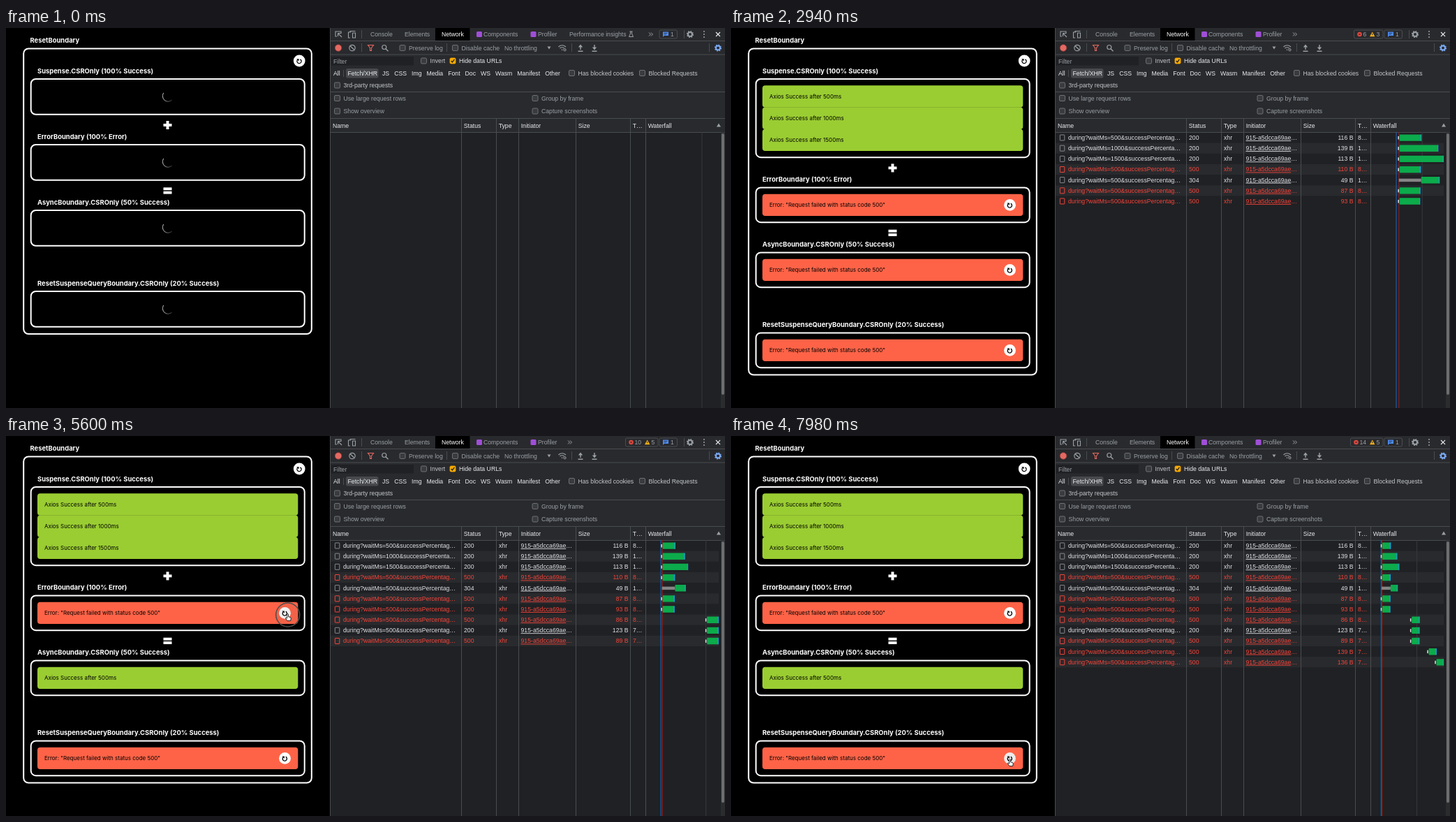
Recreate the animation shown at these times as an HTML page. Size 1030 by 544 pixels, loop 8 s.

```html
<!DOCTYPE html>
<html lang="en">
<head>
<meta charset="utf-8">
<title>Async boundaries</title>
<style>
html, body { margin: 0; width: 100%; height: 100%; overflow: hidden; background: #000; }
svg { display: block; width: 1030px; height: 544px; }
text { font: 8.7px "Liberation Sans", Arial, sans-serif; white-space: pre; }
.label { font: 700 9.42px Inter, Roboto, sans-serif; fill: #fff; }
.msg { font: 8px Inter, Roboto, sans-serif; fill: #000; }
.link { text-decoration: underline; }
</style>
</head>
<body>
<svg id="stage" viewBox="0 0 1030 544">
  <defs>
    <linearGradient id="fade"><stop offset="0" stop-color="#aaa"/><stop offset="1" stop-color="#aaa" stop-opacity=".25"/></linearGradient>
    <clipPath id="fall"><rect x="917" y="149" width="104.3" height="395"/></clipPath>
  </defs>
  <g id="tools"></g>
  <g id="live"></g>
</svg>
<script>
const LOOP = 8000, STEP = 70;
const LIGHT = '#e8eaed', SOFT = '#c3c7cb', DIM = '#9aa0a6', LINE = '#494c50', RED = '#f5443a';
const COLS = { Status: 652, Type: 702, Initiator: 734, Size: 816, 'T…': 894, Waterfall: 916 };

// ---- drawing helpers ----
const rect = (x, y, w, h, fill, more = '') => `<rect x="${x}" y="${y}" width="${w}" height="${h}" fill="${fill}" ${more}/>`;
const text = (x, y, s, fill = LIGHT, more = '') => `<text x="${x}" y="${y + 3}" fill="${fill}" ${more}>${s}</text>`;
const path = (d, stroke, width = 1, more = 'fill="none"') => `<path d="${d}" stroke="${stroke}" stroke-width="${width}" ${more}/>`;
const shape = (d, fill) => `<path d="${d}" fill="${fill}"/>`;
const circle = (x, y, r, fill, more = '') => `<circle cx="${x}" cy="${y}" r="${r}" fill="${fill}" ${more}/>`;
const ring = (x, y, r, stroke, width, more = '') => circle(x, y, r, 'none', `stroke="${stroke}" stroke-width="${width}" ${more}`);
const hline = y => rect(464, y, 566, 1, LINE);
const vline = (x, y, h, fill = LINE) => rect(x, y, 1, h, fill);
const gear = (x, y, c, r = 3) => ring(x, y, r, c, r * .67) +
  ring(x, y, r * 1.47, c, r * .47, `stroke-dasharray="${r * .58} ${r * .57}"`);
const check = (x, y, label, fill, on) =>
  rect(x - 4, y - 4, 8, 8, on ? '#f9ab00' : '#3a3b3e', `rx="1.5" stroke="${on ? '#f9ab00' : '#7d8186'}" stroke-width=".8"`) +
  (on ? path(`M${x - 2.3} ${y}l1.7 1.9 3-4`, '#202124', 1.3) : '') + text(x + 9, y, label, fill);

function toolsMarkup() {
  let s = rect(464, 0, 566, 149, '#292a2d') + rect(464, 149, 566, 395, '#202124') +
    vline(464, 0, 544) + rect(615, 0, 49.5, 18, '#000');
  s += [18, 37.5, 91, 129, 149].map(hline).join('');

  // tab bar
  s += path('M474 12h-2V5h8v3M475.5 7.5l5.5 5.5M475.5 7.5v4.5M475.5 7.5h4.5', DIM, 1.1);
  s += path('M493 6V4.5h7.5M493 14h-2.5V6h4M496.5 7h4v7h-4z', DIM, 1.1);
  s += vline(509, 3, 12) + text(522, 9, 'Console', DIM) + text(571, 9, 'Elements', DIM) +
    text(624, 9, 'Network', '#fff') + text(684, 9, 'Components', DIM) + text(762, 9, 'Profiler', DIM);
  s += rect(674, 5, 8, 8, '#a04fd8', 'rx="1.5"') + rect(751.5, 5, 8, 8, '#a04fd8', 'rx="1.5"');
  s += rect(936, 3, 25.5, 12, 'none', `rx="2" stroke="${LINE}"`) + shape('M941 5.5h8v5.5h-6l-2 2z', '#4c8df6') +
    path('M942.5 7.3h5M942.5 9h3.5', '#292a2d', .7) + text(952, 9, '1', DIM);
  s += vline(971, 3, 12) + gear(980, 9, DIM) + [5, 9, 13].map(y => circle(1000, y, 1, DIM)).join('') +
    path('M1017 6l6 6M1023 6l-6 6', LIGHT, 1.2);

  // record bar
  s += circle(476, 28.5, 4.8, '#e46962', 'stroke="#8a3a38" stroke-width=".8"');
  s += ring(496, 28.5, 4.2, DIM, 1.2) + path('M493 25.5l6 6', DIM, 1.2);
  s += vline(509, 22, 12) + path('M518.5 24.5h8l-3 4v4h-2v-4z', '#e46962', 1.1);
  s += ring(541.8, 27.5, 3, DIM, 1.2) + path('M544 29.8l3.5 3.5', DIM, 1.4);
  s += check(568, 28.5, 'Preserve log', DIM) + vline(631, 22, 12) + check(643.5, 28.5, 'Disable cache', DIM) +
    text(714, 28.5, 'No throttling', DIM) + shape('M775.5 26.5h5l-2.5 4z', DIM);
  s += path('M791.5 27q5-4.5 10.5 0M793.5 29q3-2.5 6 0M796 30.5l1 1.5', DIM, 1.2) + gear(800.5, 31.2, DIM, 1.4);
  s += vline(810, 22, 12) + path('M823 31v-5M819.5 33.2h7M843 24v5M839.5 33.2h7', DIM, 1.4) +
    shape('M819.8 27.5l3.2-4 3.2 4zM839.8 27.5l3.2 4 3.2-4z', DIM);
  s += vline(1007, 22, 12) + gear(1020, 28.5, '#7cacf8');

  // filters
  s += rect(466, 41, 118, 12.5, '#202124') + text(469, 48, 'Filter', DIM) +
    check(598.5, 47, 'Invert', SOFT) + check(640, 47, 'Hide data URLs', LIGHT, true);
  const kinds = 'JS CSS Img Media Font Doc WS Wasm Manifest Other'.split(' ');
  s += rect(487, 58, 46.5, 13.5, '#47494d', 'rx="2.5"') + vline(483, 60, 10) + text(469, 64.5, 'All') +
    text(489.5, 64.5, 'Fetch/XHR' + kinds.map(k => `<tspan dx="7">${k}</tspan>`).join(''));
  s += check(810.5, 64.5, 'Has blocked cookies', SOFT) + check(911.5, 64.5, 'Blocked Requests', SOFT) + check(474.5, 82, '3rd-party requests', SOFT);
  s += check(474.5, 100.5, 'Use large request rows', DIM) + check(758, 100.5, 'Group by frame', DIM) +
    check(474.5, 119, 'Show overview', DIM) + check(758, 119, 'Capture screenshots', DIM);

  // table head
  s += text(468, 139.5, 'Name') + shape('M1018 141.5l3-5 3 5z', DIM);
  for (const c in COLS) s += text(COLS[c] + 3.7, 139.5, c);
  return s + rect(1024, 149.5, 6, 395, '#2b2c2e') + rect(1025, 151, 4, 374, '#6d6e70', 'rx="2"');
}

// ---- story: each batch of requests starts with a load or a click ----
// click: stage time; sent, took: waterfall ms; calls: "wait status bytes"; hits: outcome per boundary
const BATCHES = [
  { click: 490, sent: 1100, took: 860, hits: ['ok', 'error', 'error', 'error'],
    calls: ['500 200 116', '1000 200 139', '1500 200 113', '500 500 110', '500 304 49', '500 500 87', '500 500 93'] },
  { click: 3570, sent: 4170, took: 804, hits: [, 'error', 'ok', 'error'], calls: ['500 500 86', '500 200 123', '500 500 89'] },
  { click: 5740, sent: 5950, took: 790, hits: [, 'error'], calls: ['500 500 139'] },
  { click: 6650, sent: 6750, took: 750, hits: [, , , 'error'], calls: ['500 500 136'] }
];
const [LOAD, RESET] = BATCHES;
const replyAt = (batch, wait = 500) => batch.click + 770 + .85 * (wait - 500);

const CALLS = BATCHES.flatMap(batch => {
  const list = batch.calls.map((spec, i) => {
    const [wait, status, size] = spec.split(' ').map(Number);
    const slow = 900 * (1 - (1.5 - wait / 1000) ** 2);
    const cached = status === 304;
    const from = batch.sent + (cached ? batch.took : 0);
    const to = cached ? from + 720 : from + batch.took - 9 * i + slow;
    const answered = replyAt(batch, wait) - (i % 5 ? 0 : 140);
    return { wait, status, size, from, to, cached, shown: batch.click, answered, done: answered + 220, queued: batch.sent };
  });
  batch.end = Math.max(...list.map(c => c.to));
  batch.ramp = .6 * Math.max(...list.map(c => c.wait));
  return list;
});

const clamp = u => Math.min(1, Math.max(0, u));
const smooth = u => u * u * (3 - 2 * u);
const latest = (t, hit = () => true) => BATCHES.filter(b => t >= b.click && hit(b)).pop() || LOAD;

// ms covered by the waterfall
function spanAt(t) {
  const b = latest(t);
  return b.sent + 10 + (b.end - b.sent) * clamp((t - replyAt(b) - 70) / b.ramp);
}

function boundary(i, t, wait) {
  const b = latest(t, b => b.hits[i]);
  return t < replyAt(b, wait) ? 'load' : b.hits[i];
}

// ---- network panel ----
function badges(t) {
  const errors = 2 * CALLS.filter(c => c.status === 500 && t >= c.done).length;
  const warnings = t < LOAD.click ? 0 : 3 + (t >= RESET.click) + (t >= replyAt(RESET));
  const more = x => path(`M${x - 3} 6.5l2.5 2.5-2.5 2.5M${x} 6.5l2.5 2.5-2.5 2.5`, DIM);
  if (!warnings) {
    return text(807, 9, 'Performance insights', DIM) + more(924) + path('M893.5 5h4M894.5 5v3l-2 4.5h6l-2-4.5v-3', DIM);
  }
  const left = errors ? (errors > 9 ? 887.5 : 892.5) : 911;
  let s = more(808) + rect(left, 3, 934 - left, 12, 'none', `rx="2" stroke="${LINE}"`);
  if (errors) {
    const x = left + 8;
    s += circle(x, 9, 3.3, '#e5493f') + path(`M${x - 1.3} 7.7l2.6 2.6m0-2.6l-2.6 2.6`, '#292a2d', .9) + text(x + 5, 9, errors, DIM);
  }
  return s + shape('M915 12.3l3.7-6.8 3.7 6.8z', '#f6b21b') + vline(918.2, 7.8, 2.5, '#292a2d') + text(924.5, 9, warnings, DIM);
}

function bar(c, at, span) {
  const a = at(c.from), b = at(Math.min(c.to, span));
  let s = c.cached ? rect(at(c.queued) - 1, 0, a - at(c.queued) + 1, 4.5, '#858585') : rect(a - 2.3, 0, 1.5, 4.5, '#e4e4e4');
  if (b > a) s += rect(a, -2.6, b - a, 9.4, '#0cab4b', 'rx=".8"');
  if (c.to <= span) s += rect(b - .9, -2.6, 1.4, 9.4, '#209bd0');
  return s;
}

function network(t) {
  const span = spanAt(t), at = ms => 918 + 103 * ms / span;
  const shown = CALLS.filter(c => t >= c.shown);
  // the cached reply sits one row higher until the first batch settles
  if (shown.length && t < 2240) shown.splice(3, 0, ...shown.splice(4, 1));
  let s = '', bars = '';
  shown.forEach((c, i) => {
    const y = 157 + 15.16 * i, pending = t < c.answered, loading = t < c.done;
    const bad = c.status === 500 && !pending;
    const fill = bad ? RED : '#dfe1e5', faint = bad ? RED : DIM;
    const part = c.size - (c.status > 200 ? 32 : 45);
    if (i % 2) s += rect(465, y - 7.6, 556, 15.16, '#292a2d');
    s += rect(471.3, y - 4, 6.5, 8, 'none', `stroke="${bad ? RED : '#85898e'}" rx=".5"`);
    s += text(483, y, `during?waitMs=${c.wait}&amp;successPercenta${c.wait > 999 ? '' : 'g'}…`, fill);
    s += text(656, y, pending ? '(pending)' : c.status, pending ? DIM : fill) + text(706, y, 'xhr', fill);
    s += text(737.5, y, '<tspan class="link">915-a5dcca69ae</tspan>…', fill);
    s += text(891.5, y, (pending ? 0 : loading ? part : c.size) + ' B', fill, 'text-anchor="end"');
    s += text(898, y, (loading ? 'P' : String(c.to - c.queued)[0]) + '…', loading ? faint : fill);
    if (!pending) bars += `<g transform="translate(0 ${y - 2})">${bar(c, at, span)}</g>`;
  });

  s += Object.values(COLS).map(x => vline(x, 130, 414)).join('');
  const grid = x => vline(x - .5, 149, 395, '#37393c');
  if (t < LOAD.click) return s + grid(997);
  const tick = span < 1500 ? 520 : span < 4300 ? 2000 : span < 5100 ? 4100 : 4700;
  s += grid(at(tick)) + rect(at(970) - .5, 149, 1, 395, '#1769c4') + rect(at(1075) - .5, 149, 1, 395, '#9c2020');
  return s + `<g clip-path="url(#fall)">${bars}</g>`;
}

// ---- page ----
const frame = (x, y, w, h) => rect(x, y, w, h, 'none', 'rx="7" stroke="#fff" stroke-width="2"');
const reload = (x, y, fill) => circle(x, y, 8.4, fill) +
  path(`M${x + 1.2} ${y - 2.2}a3.1 3.1 0 1 1-3.6 .6`, '#000', 1.3) + shape(`M${x - 4} ${y - 2.8}h3.4v3.2z`, '#000');

function box(kind, y, t, lines, hover) {
  const inner = { load: 32.2, error: 31.2, ok: 31.2 * lines.length }[kind];
  const card = (top, fill, msg) => rect(45, top, 373.3, 31.4, fill, 'rx="4"') + text(55, top + 15.7, msg, '#000', 'class="msg"');
  let s = frame(35.7, y + 1, 392, inner + 18.6);
  if (kind === 'load') {
    const turn = (t < RESET.click ? t : t - RESET.click - 140) / 600 * 360;
    s += `<g transform="translate(231.3 ${y + 26.4}) rotate(${turn})">${path('M-5.5 -5.5A7.8 7.8 0 0 0 6.4 4.5', 'url(#fade)', 1.1)}</g>`;
  } else if (kind === 'error') {
    s += card(y + 10.3, '#ff6347', 'Error: "Request failed with status code 500"') + reload(399.5, y + 26, hover ? '#ececec' : '#fff');
  } else {
    lines.forEach((ms, i) => s += card(y + 10.3 + 31.2 * i, '#9acd32', `Axios Success after ${ms}ms`));
  }
  return [s, y + inner + 20.6];
}

const PARTS = [
  { name: 'Suspense.CSROnly (100% Success)', lines: [500, 1000, 1500], gap: 41.2 },
  { name: 'ErrorBoundary (100% Error)', lines: [500], gap: 41.2 },
  { name: 'AsyncBoundary.CSROnly (50% Success)', lines: [500], gap: 63.2 },
  { name: 'ResetSuspenseQueryBoundary.CSROnly (20% Success)', lines: [500], gap: 0 }
];

function page(t) {
  const label = (x, y, s) => text(x, y + .4, s, '#fff', 'class="label"');
  const bars = (...ys) => ys.map(y => rect(225.5, y, 12, 3.9, '#fff')).join('');
  let s = label(34.5, 18, 'ResetBoundary'), y = 72;
  PARTS.forEach(({ name, lines, gap }, i) => {
    const mid = y - 27;
    s += label(45, y - 10.5, name);
    if (i === 1) s += bars(mid - 2) + rect(229.5, mid - 6, 4, 12, '#fff');
    if (i === 2) s += bars(mid - 4.7, mid + .7);
    const [markup, end] = box(boundary(i, t, lines[lines.length - 1]), y, t, lines, i === 3 && t >= 6440);
    s += markup;
    y = end + gap;
  });
  s += frame(25.2, 29.5, 412.6, y + 9.3 - 29.5);
  return s + reload(420.2, 47, t >= 3360 && t < 5180 ? '#dcdcdc' : '#fff');
}

// ---- pointer: glides to each button, rests, clicks ----
const GLIDES = [
  { from: 2800, to: 3430, x: 421.5, y: 57 },
  { from: 5040, to: 5600, x: 404.5, y: 260 },
  { from: 5740, to: 6510, x: 399, y: 466 },
  { from: 7000, to: 7980, x: 400.5, y: 468 }
];

function pointer(t) {
  if (t < GLIDES[0].from) return '';
  let x = 440, y = -15;
  for (const g of GLIDES) {
    const u = smooth(clamp((t - g.from) / (g.to - g.from)));
    x += (g.x - x) * u;
    y += (g.y - y) * u;
  }
  const pressed = BATCHES.some(b => t >= b.click - 140 && t < b.click);
  const halo = pressed ? circle(x - .8, y - 4, 17, 'rgba(90,90,90,.08)', 'stroke="#4d4d4d" stroke-width="1.5"') : '';
  return halo + `<g transform="translate(${x} ${y})">` +
    path('M-1.8 -4.5a.9.9 0 0 1 1.8 0V-1.2l2.6.6q1.2.3 1.1 1.5L3.2 4.5H-1.6L-4 1.1q-.4-1 .6-1.1l1.6 1z', '#000', .8, 'fill="#fff"') + '</g>';
}

document.getElementById('tools').innerHTML = toolsMarkup();
const live = document.getElementById('live');
let last = -1;
function draw() {
  const t = Math.floor(performance.now() % LOOP / STEP) * STEP;
  if (t !== last) {
    last = t;
    live.innerHTML = page(t) + badges(t) + network(t) + pointer(t);
  }
  requestAnimationFrame(draw);
}
draw();
</script>
</body>
</html>
```
